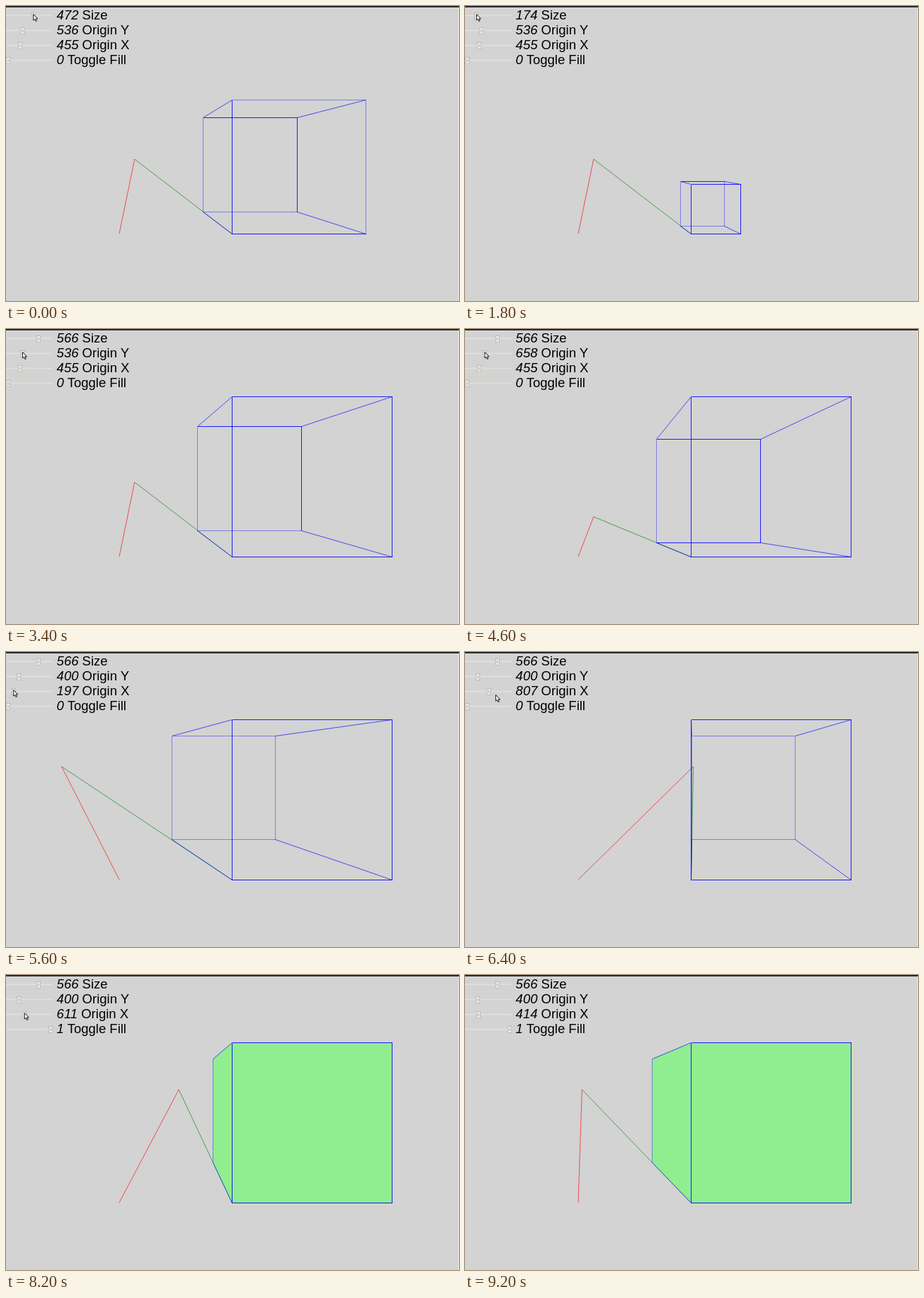
Recreate the animation shown at these times as an HTML page. Size 640 by 416 pixels, loop 9800 ms.

```html
<!DOCTYPE html>
<html lang="en">
<head>
<meta charset="utf-8">
<title>Perspective cube</title>
<style>
html, body { margin: 0; width: 100%; height: 100%; overflow: hidden; background: #d3d3d3; }
svg { display: block; width: 640px; height: 416px; }
text { font: 18.5px "Liberation Sans", Arial, sans-serif; fill: #000; white-space: pre; }
.num { font-style: italic; }
.crisp { shape-rendering: crispEdges; }
</style>
</head>
<body>
<svg viewBox="0 0 640 416">
  <rect width="640" height="416" fill="#d3d3d3"/>
  <rect x="639" width="1" height="416" fill="#e9e9e9"/>
  <rect width="640" height="2" fill="#2a2a2d"/>
  <g id="scene"></g>
  <g id="panel"></g>
  <path id="cursor" d="M0 0V8.6L2 6.9L3.4 10L4.8 9.4L3.4 6.4H6Z" fill="#fff" stroke="#000" stroke-width=".9"/>
</svg>
<script>
const LOOP = 9800, TICK = 200, SCALE = 0.4;
const CORNER = { x: 319.5, y: 321.5 };
const BLUE = '#0000ff', GREEN = '#90ee90';

// Slider keys are [time, value], linear in between
const rows = [
  { label: 'Size', max: 800, keys: [[1000, 472], [1800, 174], [2200, 110], [3000, 566]] },
  { label: 'Origin Y', max: 1600, keys: [[3400, 536], [4000, 1130], [4600, 658], [5000, 400]] },
  { label: 'Origin X', max: 1600, keys: [[5200, 455], [5600, 197], [6200, 807], [7800, 807], [8600, 414]] },
  { label: 'Toggle Fill', max: 1, keys: [[6600, 0], [6800, 1]] }
];
const [sizeRow, yRow, xRow, fillRow] = rows;

// The pointer holds one thumb during each drag and glides between them
const drags = [
  { row: sizeRow, from: 0, to: 3000 },
  { row: yRow, from: 3400, to: 5000 },
  { row: xRow, from: 5400, to: 6200 },
  { row: fillRow, from: 6800, to: 7600 },
  { row: xRow, from: 7800, to: 8600 }
];
const EXIT = { x: 12.5, y: 308.5, time: 9000 };

const byId = id => document.getElementById(id);
const scene = byId('scene'), panel = byId('panel'), cursor = byId('cursor');
const mix = (a, b, k) => a + (b - a) * k;
const snap = v => Math.floor(v) + 0.5;

function set(el, attrs) {
  for (const name in attrs) el.setAttribute(name, attrs[name]);
}

function add(parent, tag, attrs = {}) {
  const el = document.createElementNS('http://www.w3.org/2000/svg', tag);
  set(el, attrs);
  parent.appendChild(el);
  return el;
}

function valueAt(row, t) {
  const next = row.keys.findIndex(key => key[0] > t);
  if (next === 0) return row.keys[0][1];
  if (next < 0) return row.keys[row.keys.length - 1][1];
  const [t0, v0] = row.keys[next - 1], [t1, v1] = row.keys[next];
  return Math.round(mix(v0, v1, (t - t0) / (t1 - t0)));
}

const thumbX = (row, t) => 3.3 + 60 * valueAt(row, t) / row.max;
const grip = (row, t) => ({ x: thumbX(row, t), y: row.mid - 1.5 });

const slant = color => add(scene, 'line', { stroke: color, 'stroke-width': 0.65 });
const four = make => Array.from({ length: 4 }, make);
const edge = () => add(scene, 'line', { stroke: BLUE, class: 'crisp' });

// Creation order is paint order
const redRay = slant('#ff0000'), greenRay = slant('#008000');
const backEdges = four(edge);
const side = add(scene, 'polygon');
const sideEdge = edge();
const diagonals = four(() => slant(BLUE));
const face = add(scene, 'rect', { class: 'crisp' });
const frontEdges = four(edge);

rows.forEach((row, i) => {
  const mid = row.mid = 13 + 21 * i;
  add(panel, 'rect', { y: mid - 0.5, width: 66, height: 2, fill: '#e2ded8' });
  row.thumb = add(panel, 'g');
  add(row.thumb, 'rect', {
    x: -2.5, y: mid - 3.5, width: 5, height: 9, fill: '#f0ede8', stroke: '#a5a199', 'stroke-width': 0.6
  });
  add(row.thumb, 'path', { d: `M-1 ${mid}h2m-2 2h2`, stroke: '#8c8880', 'stroke-width': 0.8 });
  const text = add(panel, 'text', { x: 71.6, y: mid + 6.2 });
  row.num = add(text, 'tspan', { class: 'num' });
  add(text, 'tspan').textContent = ' ' + row.label;
});

function join(el, a, b) {
  set(el, { x1: a.x, y1: a.y, x2: b.x, y2: b.y });
}

// Downscaled hairlines: strong on odd pixels, faint on even ones
function joinEdge(el, a, b) {
  join(el, a, b);
  const pixel = Math.floor(a.x === b.x ? a.x : a.y);
  el.setAttribute('stroke-opacity', pixel % 2 ? 0.85 : 0.4);
}

function square(x, y, size) {
  const left = snap(x), right = snap(x + size), top = snap(y - size), bottom = snap(y);
  return [
    { x: left, y: bottom }, { x: left, y: top }, { x: right, y: top }, { x: right, y: bottom }
  ];
}

function drawCube(t) {
  const size = valueAt(sizeRow, t), depth = size / 1600;
  const origin = { x: valueAt(xRow, t) * SCALE - 0.3, y: valueAt(yRow, t) * SCALE + 1.6 };
  const front = square(CORNER.x, CORNER.y, size * SCALE);
  const back = square(
    mix(CORNER.x, origin.x, depth),
    mix(CORNER.y, origin.y, depth),
    size * SCALE * (1 - depth)
  );
  const paint = valueAt(fillRow, t) ? GREEN : 'none';

  join(redRay, { x: 160, y: 321 }, origin);
  join(greenRay, origin, CORNER);
  for (let i = 0; i < 4; i++) {
    const next = (i + 1) % 4;
    joinEdge(backEdges[i], back[i], back[next]);
    joinEdge(frontEdges[i], front[i], front[next]);
    join(diagonals[i], front[i], back[i]);
  }
  joinEdge(sideEdge, back[0], back[1]);
  backEdges[0].setAttribute('stroke-opacity', 0);
  set(side, {
    points: [front[0], front[1], back[1], back[0]].map(p => p.x + ',' + p.y).join(' '),
    fill: paint
  });
  set(face, {
    x: front[1].x, y: front[1].y, fill: paint,
    width: front[2].x - front[1].x, height: front[0].y - front[1].y
  });
}

function pointerAt(t) {
  const i = drags.filter(drag => drag.from <= t).length - 1;
  const { row, to } = drags[i], next = drags[i + 1];
  if (t <= to) return grip(row, t);
  const a = grip(row, to);
  const b = next ? grip(next.row, next.from) : EXIT;
  const k = (t - to) / ((next ? next.from : EXIT.time) - to);
  return { x: mix(a.x, b.x, k), y: mix(a.y, b.y, k) };
}

function drawPanel(t) {
  for (const row of rows) {
    row.num.textContent = valueAt(row, t);
    row.thumb.setAttribute('transform', `translate(${thumbX(row, t)} 0)`);
  }
  const { x, y } = pointerAt(t);
  cursor.setAttribute('transform', `translate(${x} ${y})`);
}

const begin = performance.now();

function frame() {
  const now = (performance.now() - begin) % LOOP;
  const t = Math.floor(now / TICK) * TICK;
  drawCube(t);
  drawPanel(t);
  requestAnimationFrame(frame);
}
frame();
</script>
</body>
</html>
```
